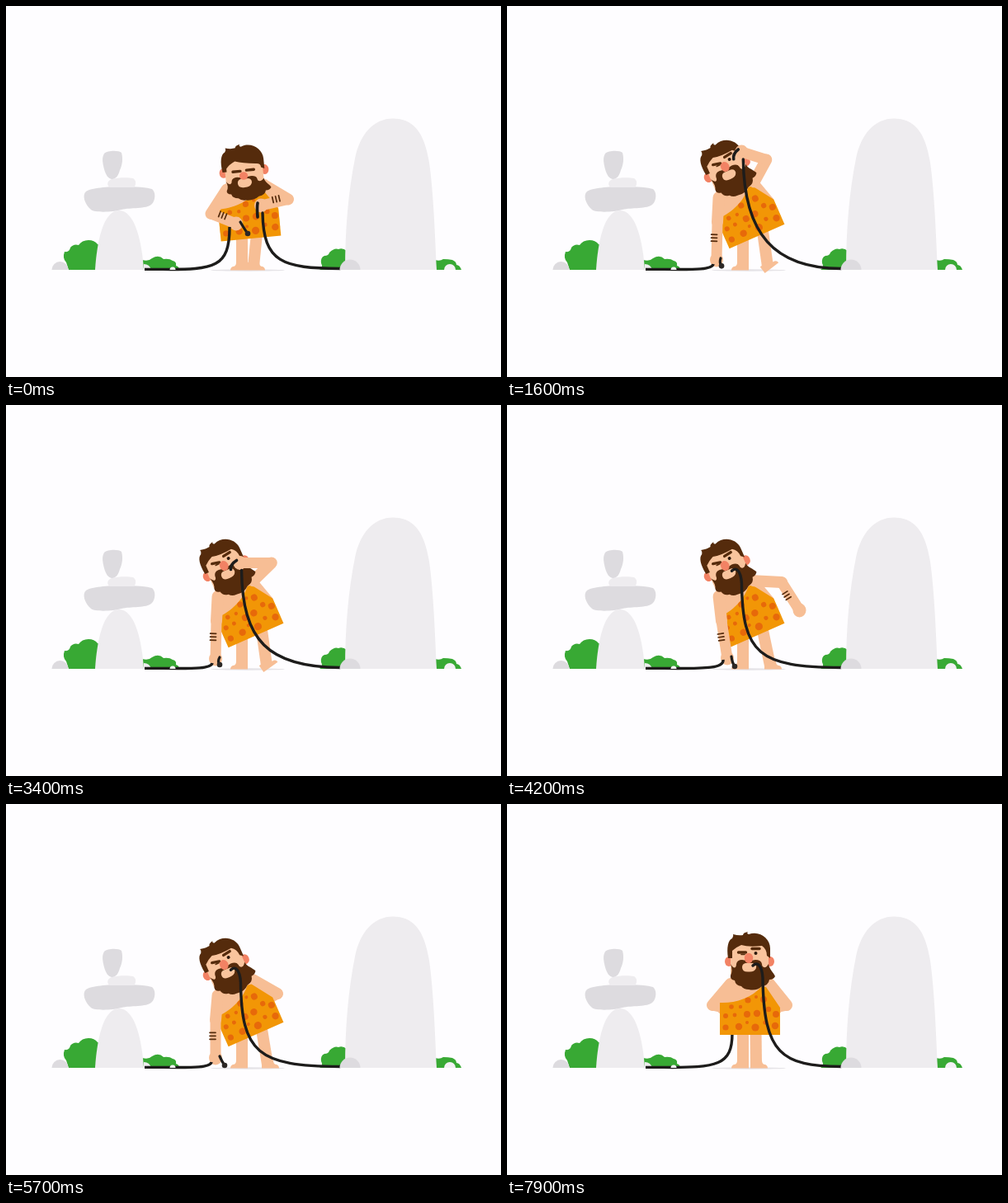
An HTML page with a canvas that plays this animation: 600 by 450 pixels, repeating every 8 s.

```html
<!DOCTYPE html>
<html lang="en">
<head>
<meta charset="utf-8">
<title>Caveman and cables</title>
<style>
html, body { margin: 0; width: 100%; height: 100%; overflow: hidden; background: #fefdff; }
canvas { display: block; width: 600px; height: 450px; }
</style>
</head>
<body>
<canvas id="stage" width="600" height="450"></canvas>
<script>
const ctx = document.getElementById('stage').getContext('2d');
const LOOP = 8000, STEP = 100;
const PAPER = '#fefdff', PALE = '#eeecef', GREY = '#dddbdf', GREEN = '#38a934';
const SKIN = '#f7be95', FACE = '#f9c49d', HAIR = '#552b0c', BLUSH = '#f28264';
const CLOTH = '#f29606', SPOT = '#e7690a', BLACK = '#1d1c1b';

const shape = (color, d) => { ctx.fillStyle = color; ctx.fill(new Path2D(d)); };
const dot = (color, x, y, r, ry = r) => {
  ctx.fillStyle = color;
  ctx.beginPath();
  ctx.ellipse(x, y, r, ry, 0, 0, 7);
  ctx.fill();
};
const mound = (color, x, r) => {
  ctx.fillStyle = color;
  ctx.beginPath();
  ctx.arc(x, 320, r, Math.PI, 0);
  ctx.fill();
};
const line = (color, width, d, cap = 'round') => {
  ctx.strokeStyle = color;
  ctx.lineWidth = width;
  ctx.lineCap = cap;
  ctx.lineJoin = 'round';
  ctx.stroke(new Path2D(d));
};

// Poses, in stage coordinates.
// le/lh, re/rh: elbow and hand; lp, rp: plug offset from hand;
// rf: right ankle x and foot angle; lc: left cable end and control; sag: right cable bend
const stand = {
  hip: [294.5, 280], rot: 0, dy: 0, look: 0, frown: 0,
  le: [249, 244], lh: [262, 247], re: [339, 244], rh: [326, 247],
  side: -1, lp: [11, 8], rp: [-8, 10], rf: [302, 0],
  lc: [273, 278, 273, 317], sag: [.86, 333]
};
const hold = {
  ...stand, hip: [297, 282], rot: -5.6, dy: 10, look: 1,
  le: [248.5, 252], lh: [279, 264], re: [342, 234.5], rh: [309, 242],
  side: 1, lp: [14, 12], rp: [-4, 15], rf: [300, 0],
  lc: [271, 268, 271, 317], sag: [.9, 335]
};
const raise = {
  ...stand, hip: [303, 279.5], rot: -23.7, frown: 1,
  le: [255, 262], lh: [254, 308], re: [302, 180], rh: [283, 153],
  lp: [8, 8], rp: [-7, 11], rf: [316, -34],
  lc: [250, 313, 249, 319.5], sag: [.61, 335]
};
const feed = {
  ...raise, re: [321, 190], rh: [285, 190],
  lp: [5, 7], rp: [-11, 9], rf: [316, -40], sag: [.72, 317]
};
const nudge = { ...feed, re: [322, 192], rh: [283, 192], rf: [316, -34] };
const swing = { ...feed, re: [322, 186], rh: [312, 157], rf: [318, -12], sag: [.78, 310] };
const drop = {
  ...raise, le: [260, 262], lh: [267, 307], re: [333, 215], rh: [354.5, 249],
  lp: [9, 10], rf: [319, 0], lc: [262, 309, 263, 319], sag: [.84, 305]
};
const rest = { ...drop, re: [329, 230], rh: [318, 236] };
const lean = {
  ...rest, le: [254, 262], lh: [254, 308], lp: [11, 9], rf: [317, 0], lc: [249, 313, 248, 319.5]
};
const rise = {
  ...stand, hip: [298, 280], rot: -9, frown: .3, rf: [309, 0],
  le: [248, 248], lh: [268, 270], re: [337, 240], rh: [324, 244],
  lc: [268, 276, 268, 318], sag: [.85, 322]
};
const settle = { ...stand, dy: -.6, lc: [273, 278, 271, 317], sag: [.85, 331] };

const keys = [
  [0, hold], [200, hold], [800, raise], [1300, raise], [1800, feed],
  [2400, feed], [2700, nudge], [3000, feed], [3300, nudge], [3600, feed],
  [3850, swing], [4150, drop], [4300, drop], [4750, rest], [5000, rest],
  [5400, lean], [5700, lean], [6100, rise], [6350, stand], [6400, stand],
  [6700, settle], [7100, stand], [7500, settle], [7900, stand], [8000, stand]
];

const mix = (a, b, k) => Array.isArray(a) ? a.map((v, i) => mix(v, b[i], k)) : a + (b - a) * k;

function poseAt(t) {
  let i = 1;
  while (i < keys.length - 1 && keys[i][0] <= t) i++;
  const [t0, a] = keys[i - 1], [t1, b] = keys[i];
  const u = (t - t0) / (t1 - t0), k = u * u * (3 - 2 * u), out = {};
  for (const name in a) out[name] = mix(a[name], b[name], k);
  return out;
}

function bodyPoint(p, x, y) {
  const a = p.rot * Math.PI / 180, c = Math.cos(a), s = Math.sin(a);
  const dx = x - stand.hip[0], dy = y - stand.hip[1];
  return [p.hip[0] + dx * c - dy * s, p.hip[1] + dx * s + dy * c];
}

function inBody(p, draw) {
  ctx.save();
  ctx.translate(...p.hip);
  ctx.rotate(p.rot * Math.PI / 180);
  ctx.translate(-stand.hip[0], -stand.hip[1]);
  draw();
  ctx.restore();
}

function scenery() {
  ctx.fillStyle = PAPER;
  ctx.fillRect(0, 0, 600, 450);
  // left bush and stacked stones
  shape(GREEN, 'M76 320L73 311Q68 306 71 298Q77 299 78 293Q82 288 88 290Q92 284 100 284Q107 284 111 289L118 291V320Z');
  mound(GREY, 65.5, 10);
  shape(GREEN, 'M165 308Q173 310 177 306Q185 301 191 307Q198 306 202 309Q207 310 206 315Q210 316 210 320H165Z');
  shape(PALE, 'M108 320C110 289 117 248 137 248C157 248 165 289 167 320Z');
  shape(GREY, 'M97 225C108 217 166 218 177 222C182 226 181 236 177 240C170 247 151 244 140 247C130 250 108 251 103 247C95 240 92 229 97 225Z');
  shape(PALE, 'M128 210C135 208 149 208 154 209C158 211 158 217 155 220H126C122 218 122 212 128 210Z');
  shape(GREY, 'M119 179C123 175 137 175 140 178C142 185 141 193 138 199C136 206 134 209 129 210C124 210 121 205 119 198C117 190 116 184 119 179Z');
  shape(PALE, 'M167 320V313Q174 313 176 320Z');
  // right bushes and monolith
  shape(GREEN, 'M380 320Q385 317 382 312Q381 305 386 303Q391 303 392 299Q398 293 403 295Q408 293 413 297V320Z');
  shape(GREEN, 'M520 308Q526 310 530 307Q536 307 541 308Q546 310 546 314Q550 314 552 320H520Z');
  shape(PALE, 'M411 320C411 270 415 225 423 185C429 155 446 136.5 469 136.5C493 136.5 507 152 513 190C518 225 520 275 522 320Z');
  mound('#f3f1f4', 538, 7);
  dot('#e5e3e7', 293, 320.5, 45, 1.2);
}

function foot(x, angle, flip) {
  ctx.save();
  ctx.translate(x, 317);
  ctx.scale(flip, 1);
  ctx.rotate(angle * Math.PI / 180);
  shape(SKIN, 'M-7 -6H7Q7 -1 11 -1Q14 0 14 3.5H-7Z');
  ctx.restore();
}

function legs(p) {
  line(SKIN, 14, 'M286 274V317', 'butt');
  foot(286, 0, -1);
  line(SKIN, 14, `M${p.hip[0] + 7} ${p.hip[1] - 6}L${p.rf[0]} 316`, 'butt');
  foot(...p.rf, 1);
}

const torso = () => shape(SKIN, 'M270 211Q294 200 321 211L331 246V270H258V243Z');

function tunic() {
  const d = 'M258 241C275 242 296 236 309 221L314 222L331 247V280H258Z';
  shape(CLOTH, d);
  ctx.save();
  ctx.clip(new Path2D(d));
  const spots = [
    [272, 246, 2.8], [283, 246, 2.2], [292, 238, 3.6], [302, 234, 2], [311, 237, 4],
    [265, 257, 3], [276, 256, 2.4], [291, 255, 4], [303, 254, 4.2], [317, 249, 3.2], [326, 255, 4],
    [265, 271, 3.6], [281, 270, 4.2], [291, 265, 2], [301, 271, 4.6], [313, 265, 2.6], [325, 269, 4.2]
  ];
  for (const [x, y, r] of spots) dot(SPOT, x, y, r);
  ctx.restore();
}

function brow(x, y, angle) {
  ctx.save();
  ctx.translate(x, y);
  ctx.rotate(angle * Math.PI / 180);
  line(HAIR, 3.4, 'M-4.5 0H4.5');
  ctx.restore();
}

function beard(look) {
  ctx.save();
  ctx.translate(0, 226 - 2 * look);
  ctx.scale(1, 1 - .2 * look);
  ctx.translate(0, -226);
  shape(HAIR, 'M271 194C275 201 278 199 278 194Q279 189 285 189Q293 191 301 189Q308 189 309 194C309 199 314 200 317 194C318 201 323 204 325 209Q323 213 318 213Q317 220 309 221Q303 227 293 225Q287 225 284 221Q277 220 276 214Q270 213 271 208Q274 202 271 194Z');
  ctx.restore();
}

function head(p, open) {
  const s = p.look;
  ctx.translate(0, p.dy);
  dot(BLUSH, 269, 191 - 3 * s, 5, 6);
  dot(BLUSH, 319, 191 - 3 * s, 5, 6);
  shape(FACE, 'M271 172Q294 160 317 172V208H271Z');
  beard(s);
  // hair
  shape(HAIR, `M268 187C266 174 268 165 273 163Q275 160 274 158Q281 160 286 159Q286 156 292 155Q290 157 293 158C306 153 319 163 319 175V187L315 ${184 + s}Q315 ${176 + 4 * s} 309 ${172 + 8 * s}Q293 ${174 + 4 * s} 284 ${171 + 4 * s}Q277 ${174 + 4 * s} 273 ${178 + 5 * s}V187Z`);
  ctx.translate(0, 4 * s);
  shape(FACE, 'M289 193H298Q303 194 302 199Q300 204 293 203.5Q285 204 285 198Q285 194 289 193Z');
  ctx.translate(0, 3.5 * s);
  brow(285, 180, 13 * p.frown);
  brow(301.5, open ? 175.5 : 179.5, -9 * p.frown);
  if (open) {
    line(HAIR, 1.6, 'M284 182.5H288');
    dot('#2c180c', 301.5, 181, 2);
  }
  dot(BLUSH, 293, 187 - s, 5.2, 6.2 - 1.5 * s);
}

const upperArm = (shoulder, elbow) => line(SKIN, 14, `M${shoulder}L${elbow}`);

function forearm(elbow, hand, side, bands) {
  line(SKIN, 13, `M${elbow}L${hand}`);
  dot(SKIN, ...hand, 8, 8.5);
  if (!bands) return;
  const dx = hand[0] - elbow[0], dy = hand[1] - elbow[1], len = Math.hypot(dx, dy) || 1;
  const nx = -dy / len * side, ny = dx / len * side;
  for (const gap of [-4, 0, 4]) {
    const k = .42 + gap / len, x = elbow[0] + dx * k, y = elbow[1] + dy * k;
    line(HAIR, 1.7, `M${x} ${y}L${x + nx * 7} ${y + ny * 7}`);
  }
}

function leftCable(p) {
  const [x, y, cx, cy] = p.lc;
  line(BLACK, 3.4, `M168 319.4H190C${cx - 18} 320 ${cx} ${cy} ${x} ${y}`, 'butt');
}

function rightCable(p, fed) {
  let x = p.rh[0] + 2, y = p.rh[1] + 9, start = `M${x} ${y}`;
  if (fed) {
    const [mx, my] = bodyPoint(p, 298, 196 + p.dy);
    x = mx + 12;
    y = my + 15;
    start = `M${mx} ${my}C${mx + 5} ${my - 5} ${mx + 11} ${my - 1} ${x} ${y}`;
  }
  const [k, cx] = p.sag;
  line(BLACK, 3.4, `${start}C${x + 1} ${y + (318 - y) * k} ${cx} 318 405 318.5`);
}

function leftPlug([x, y], [dx, dy]) {
  line(BLACK, 3.2, `M${x + 5} ${y - 2}Q${x + dx - 3} ${y + dy - 4} ${x + dx} ${y + dy}`);
  dot('#2c2826', x + dx, y + dy, 3.3);
}

function rightPlug([x, y], [dx, dy], tip) {
  line(BLACK, 3.6, `M${x - 4} ${y - 3}Q${x + dx - 1} ${y + 2} ${x + dx} ${y + dy - 1}`);
  if (tip) dot('#4f8f3c', x + dx + 1, y + dy + 1, 1.5);
}

function render(t) {
  const p = poseAt(t);
  const fed = t >= 3500, plugged = t >= 6150, hipHand = t >= 4650;
  const open = (t >= 400 && t < 5900) || t >= 7300;
  const ls = bodyPoint(p, 271, 218), rs = bodyPoint(p, 318, 218);

  scenery();
  if (plugged) leftCable(p);
  legs(p);
  inBody(p, torso);
  if (plugged) { upperArm(ls, p.le); forearm(p.le, p.lh, 1, false); }
  if (hipHand) { upperArm(rs, p.re); forearm(p.re, p.rh, 1, false); }
  inBody(p, tunic);
  if (!plugged) upperArm(ls, p.le);
  if (!hipHand) upperArm(rs, p.re);
  inBody(p, () => head(p, open));
  if (!plugged) forearm(p.le, p.lh, -p.side, true);
  if (!hipHand) forearm(p.re, p.rh, 1, t < 400 || t >= 4000);
  rightCable(p, fed);
  if (!plugged) { leftCable(p); leftPlug(p.lh, p.lp); }
  if (!fed) rightPlug(p.rh, p.rp, t >= 500 && t < 1500);
  mound(GREY, 417, 12.5);
  mound('#f6f4f7', 202, 3.5);
}

function tick(now) {
  render(Math.floor(now % LOOP / STEP) * STEP);
  requestAnimationFrame(tick);
}
render(0);
requestAnimationFrame(tick);
</script>
</body>
</html>
```
